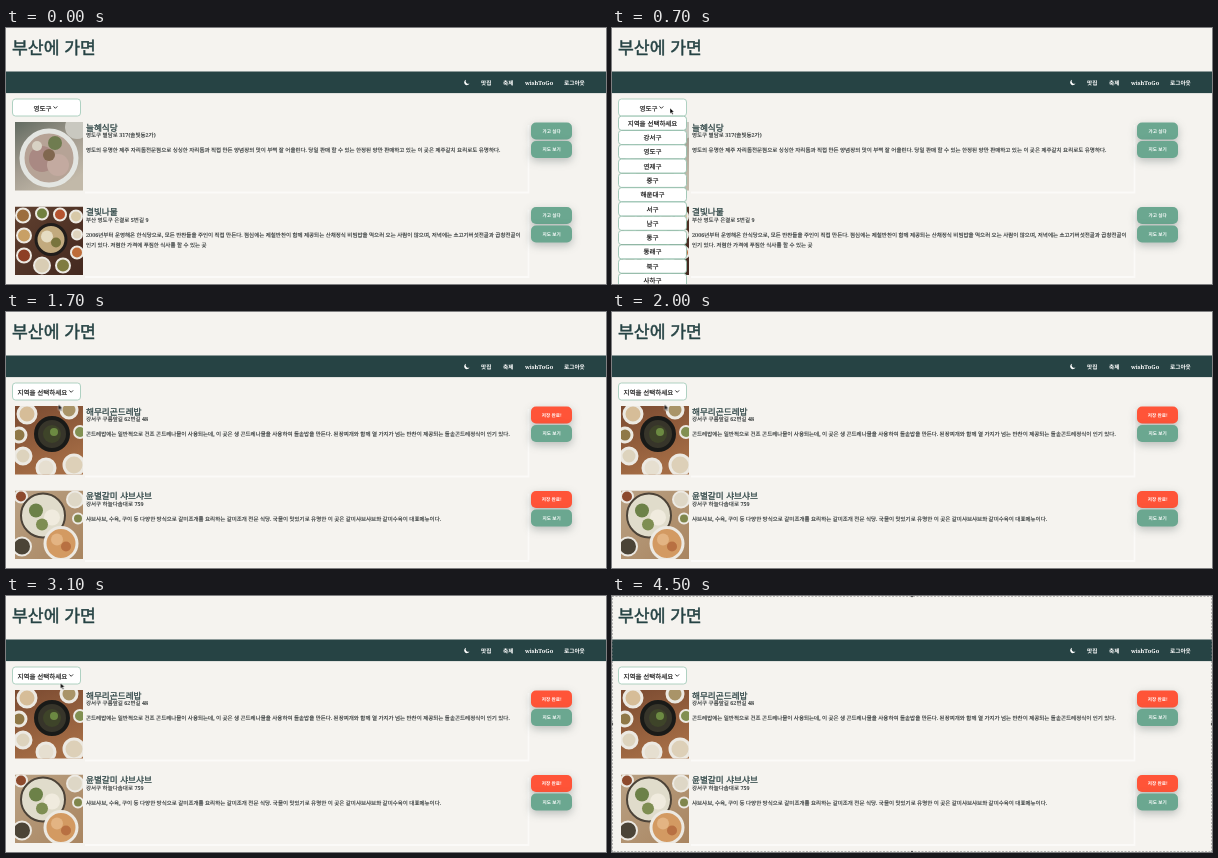
Animation of 600 by 256 pixels, one loop 4.6 s. Source, as an HTML page:

```html
<!DOCTYPE html>
<html lang="ko">
<head>
<meta charset="utf-8">
<title>부산에 가면</title>
<style>
  html, body { margin: 0; width: 100%; height: 100%; overflow: hidden; background: #f5f3ef; }
  svg { display: block; width: 600px; height: 256px; }
  text {
    font-family: 'Noto Serif', 'Noto Sans CJK KR', 'Noto Sans CJK', serif;
    font-size: 5.5px; font-weight: 500; fill: #252b2c; stroke: #252b2c; stroke-width: .12;
    text-rendering: geometricPrecision;
  }
  .sans, .name, .pick, .btn text { font-family: 'Noto Sans CJK KR', 'Noto Sans CJK', sans-serif; }
  .sans { font-size: 17.2px; font-weight: 400; fill: #264344; stroke: #264344; stroke-width: .5; }
  .nav text { font-size: 5.65px; font-weight: 600; fill: #fff; stroke: none; }
  .name { font-size: 8.65px; fill: #2d4445; stroke: #2d4445; stroke-width: .28; }
  .pick { font-size: 6.5px; fill: #111; stroke: #111; stroke-width: .16; text-anchor: middle; }
  .btn text { font-size: 4.6px; font-weight: 700; fill: #fff; stroke: none; text-anchor: middle; }
  .btn rect { filter: drop-shadow(0 3px 4px rgba(40, 60, 60, .3)); }
  .field { fill: #fff; stroke: #9cc7b4; stroke-width: .8; }
  .menu .field { stroke: #8dbca7; }
  .chevron { fill: none; stroke: #222; stroke-width: .9; }

  .before, .after, .menu, .ring, .frame { animation: 4.6s step-end infinite; }
  .before { animation-name: before; }
  .after { animation-name: after; }
  .menu { animation-name: menu; }
  .ring { animation-name: ring; }
  .frame { animation-name: frame; }
  .cursor { animation: move 4.6s linear infinite; }

  @keyframes before { 0% { opacity: 1 } 34.783%, 100% { opacity: 0 } }
  @keyframes after { 0% { opacity: 0 } 34.783%, 100% { opacity: 1 } }
  @keyframes menu { 0% { opacity: 0 } 13.043% { opacity: 1 } 34.783%, 100% { opacity: 0 } }
  @keyframes ring {
    0% { opacity: 0 } 8.696% { opacity: 1 } 13.043% { opacity: 0 }
    30.435% { opacity: 1 } 33.696%, 100% { opacity: 0 }
  }
  @keyframes frame { 0% { opacity: 0 } 89.13%, 100% { opacity: 1 } }
  @keyframes move {
    0% { transform: translate(75px, 264px) }
    8.696%, 15.217% { transform: translate(58px, 80px) }
    23.913%, 54.348% { transform: translate(52.5px, 92.5px) }
    65.217%, 78.261% { transform: translate(54.5px, 87px) }
    89.13%, 100% { transform: translate(70px, -12px) }
  }
</style>
</head>
<body>
<svg viewBox="0 0 600 256">
  <defs>
    <clipPath id="square"><rect width="68" height="68.5"/></clipPath>
    <linearGradient id="slate" x2=".6" y2="1">
      <stop stop-color="#626b61"/><stop offset=".55" stop-color="#a39c90"/><stop offset="1" stop-color="#c2b9a9"/>
    </linearGradient>
    <linearGradient id="walnut" x2="1" y2="1">
      <stop stop-color="#60402f"/><stop offset="1" stop-color="#43281f"/>
    </linearGradient>
    <linearGradient id="oak" x2=".4" y2="1">
      <stop stop-color="#7a4a31"/><stop offset="1" stop-color="#a56d45"/>
    </linearGradient>
    <linearGradient id="sand" x2="1" y2="1">
      <stop stop-color="#b9a184"/><stop offset="1" stop-color="#a98560"/>
    </linearGradient>
  </defs>

  <rect width="600" height="256" fill="#f5f3ef"/>
  <text class="sans" x="6" y="26">부산에 가면</text>

  <g class="nav">
    <rect y="43.5" width="600" height="21.6" fill="#264344"/>
    <path d="M460 51.7a2.8 2.8 0 1 0 3.5 3.8a2.7 2.7 0 0 1-3.5-3.8z" fill="#fff"/>
    <text x="475" y="56.5">맛집</text>
    <text x="497" y="56.5">축제</text>
    <text x="519" y="56.5">wishToGo</text>
    <text x="558" y="56.5">로그아웃</text>
  </g>

  <g class="before" id="first"></g>
  <g class="after" id="second"></g>

  <rect class="field" x="6.5" y="71" width="68" height="17" rx="3"/>
  <g class="before">
    <text class="pick" x="36.5" y="82.6">영도구</text>
    <path class="chevron" d="M47.5 78.4l1.9 1.9 1.9-1.9"/>
  </g>
  <g class="after">
    <text class="pick" x="36.4" y="82.6">지역을 선택하세요</text>
    <path class="chevron" d="M63.3 78.4l1.9 1.9 1.9-1.9"/>
  </g>
  <g class="menu" id="menu"></g>

  <g class="frame" fill="#555">
    <rect width="600" height="256" fill="none" stroke="#777" stroke-width="1" stroke-dasharray="2 1.5"/>
    <circle cy="128" r="1.2"/><circle cx="600" cy="128" r="1.2"/>
    <circle cx="300" r="1.2"/><circle cx="300" cy="256" r="1.2"/>
  </g>

  <g class="cursor">
    <circle class="ring" cx=".5" cy=".3" r="7" fill="rgba(120,120,120,.12)" stroke="#111" stroke-width="1.3"/>
    <path d="M0 0v5.6l1.3-1.2 1 2.2 1-.5-1-2.1h1.8z" fill="#000" stroke="#fff" stroke-width=".45"/>
  </g>
</svg>

<script>
const GREEN = '#6ba790', RED = '#ff5438', WHITE = '#ece9e2';

// Dishes: x, y, radius, filling, rim width, rim colour
const photos = {
  slate: [
    [62, 5, 12, '#c9c8c0', 0], [34, 36, 27, '#b6a396', 5, '#e3e5e1'],
    [27, 37, 13, '#a98983', 0], [43, 43, 11, '#c3aaa0', 0],
    [40, 21, 7, '#6f7c50', 0], [22, 24, 5, '#d8d2c4', 0], [34, 33, 6, '#80674f', 0]
  ],
  walnut: [
    [8, 9, 7, '#9c6e3d', 2], [27, 7, 6, '#71803f', 2], [45, 8, 6, '#b5532f', 2], [61, 10, 6, '#d8c9a8', 2],
    [9, 29, 7, '#c8a065', 2], [9, 49, 7, '#8d3f25', 2], [27, 59, 8, '#d9cdb4', 2],
    [48, 59, 7, '#7f7b40', 2], [62, 46, 6, '#bd6c39', 2], [62, 28, 5, '#ded3bd', 2],
    [36, 33, 15, '#c2aa7e', 3, '#211d1b'], [32, 30, 6, '#e5dcc2', 0], [41, 36, 5, '#78743d', 0]
  ],
  oak: [
    [12, 8, 9, '#d6bd98', 3], [54, 4, 8, '#a99468', 3], [4, 29, 7, '#8f7847', 3],
    [8, 50, 8, '#ddd3bd', 3], [31, 62, 9, '#e6dfd0', 3], [59, 59, 10, '#ddd0b8', 3],
    [65, 26, 6, '#829052', 2], [37, 28, 16, '#37352a', 4, '#191a18'],
    [37, 28, 9, '#3e4429', 0], [39, 26, 4, '#6c8a42', 0]
  ],
  sand: [
    [6, 6, 6, '#8d4a2d', 2], [60, 9, 8, '#ded7c6', 2], [7, 56, 9, '#4b4437', 2], [63, 28, 5, '#7f864c', 2],
    [28, 25, 22, '#e0dccb', 2, '#4c4338'], [21, 20, 7, '#6c8148', 0], [37, 27, 8, '#f0ebde', 0], [27, 34, 6, '#7e8e52', 0],
    [46, 53, 16, '#d39a62', 3], [42, 49, 6, '#e3b483', 0], [51, 56, 5, '#b87042', 0]
  ]
};

const dish = ([x, y, r, fill, w, rim = WHITE]) =>
  `<circle cx="${x}" cy="${y}" r="${r}" fill="${fill}" stroke="${rim}" stroke-width="${w}"/>`;

const photo = (kind, y) =>
  `<g transform="translate(9 ${y})" clip-path="url(#square)">
    <rect width="68" height="69" fill="url(#${kind})"/>${photos[kind].map(dish).join('')}</g>`;

const button = (y, label, color) =>
  `<g class="btn"><rect x="525" y="${y}" width="41" height="17" rx="5" fill="${color}"/>
    <text x="545.7" y="${y + 10.1}">${label}</text></g>`;

const card = (y, kind, name, address, lines, label, color) =>
  `<path d="M522.5 ${y + 3}V${y + 70.5}H79" fill="none" stroke="#fff" stroke-width="1.8" opacity=".55"/>
  ${photo(kind, y)}
  <text class="name" x="80" y="${y + 8.6}">${name}</text>
  <text x="80" y="${y + 15.2}">${address}</text>
  ${lines.map((line, i) => `<text x="80" y="${y + 30 + i * 10}">${line}</text>`).join('')}
  ${button(y + .5, label, color)}${button(y + 19, '지도 보기', GREEN)}`;

const fill = (id, html) => { document.getElementById(id).innerHTML = html; };

fill('first',
  card(94, 'slate', '늘혜식당', '영도구 별담로 317(솔빛동2가)', [
    '영도의 유명한 제주 자리돔전문점으로 싱싱한 자리돔과 직접 만든 양념장의 맛이 부쩍 잘 어울린다. 당일 판매 할 수 있는 한정된 양만 판매하고 있는 이 곳은 제주갈치 요리로도 유명하다.'
  ], '가고 싶다', GREEN) +
  card(178.5, 'walnut', '결빛나물', '부산 영도구 은결로 5번길 9', [
    '2006년부터 운영해온 한식당으로, 모든 반찬들을 주인이 직접 만든다. 점심에는 제철반찬이 함께 제공되는 산채정식 비빔밥을 먹으러 오는 사람이 많으며, 저녁에는 소고기버섯전골과 곱창전골이',
    '인기 있다. 저렴한 가격에 푸짐한 식사를 할 수 있는 곳'
  ], '가고 싶다', GREEN));

fill('second',
  card(94, 'oak', '해무리곤드레밥', '강서구 구름앞길 62번길 48', [
    '곤드레밥에는 일반적으로 건조 곤드레나물이 사용되는데, 이 곳은 생 곤드레나물을 사용하여 돌솥밥을 만든다. 된장찌개와 함께 열 가지가 넘는 반찬이 제공되는 돌솥곤드레정식이 인기 있다.'
  ], '저장 완료!', RED) +
  card(178.5, 'sand', '윤별갈미 샤브샤브', '강서구 하늘다솜대로 759', [
    '샤브샤브, 수육, 구이 등 다양한 방식으로 갈미조개를 요리하는 갈미조개 전문 식당. 국물이 맛있기로 유명한 이 곳은 갈미샤브샤브와 갈미수육이 대표메뉴이다.'
  ], '저장 완료!', RED));

const areas = '지역을 선택하세요,강서구,영도구,연제구,중구,해운대구,서구,남구,동구,동래구,북구,사하구'.split(',');
fill('menu', areas.map((area, i) => {
  const y = 88.2 + i * 14.3;
  return `<rect class="field" x="6.5" y="${y}" width="68" height="14" rx="3"/>
    <text class="pick" x="40.5" y="${y + 9.5}">${area}</text>`;
}).join(''));
</script>
</body>
</html>
```
